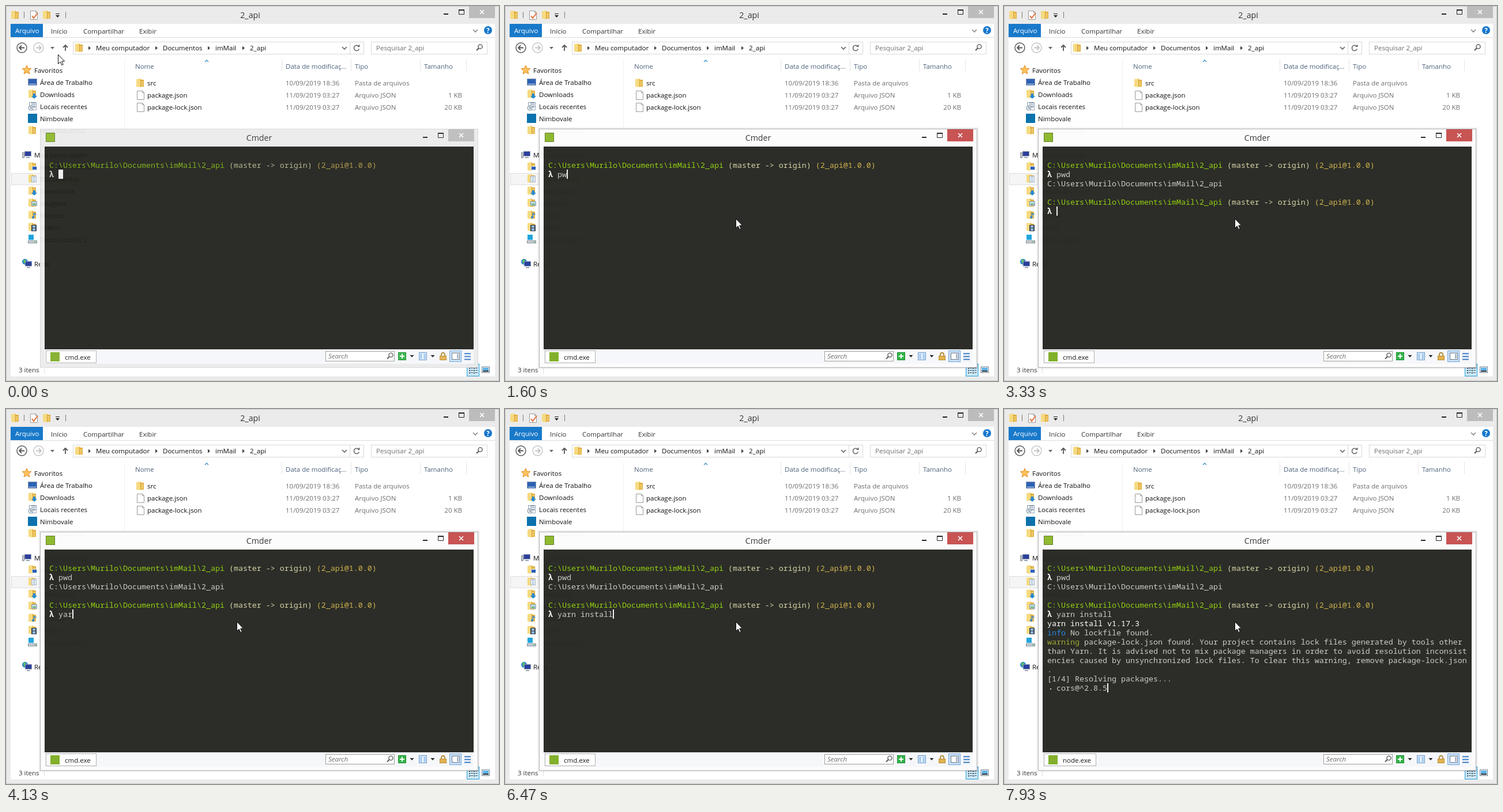
Write an HTML page that moves like this. It is 855 by 651 pixels and loops after 8 s.

```html
<!DOCTYPE html>
<html lang="pt-BR">
<head>
<meta charset="utf-8">
<title>Terminal</title>
<style>
  html, body { margin: 0; width: 100%; height: 100%; overflow: hidden; background: #ebebeb; }
  svg { display: block; width: 100vw; height: 100vh; }
  text { font-family: "Open Sans", "Noto Sans", sans-serif; font-size: 11.5px; white-space: pre; }
  .title { font-size: 14.2px; fill: #333; text-anchor: middle; }
  .term text { font-family: "Noto Sans Mono", "DejaVu Sans Mono", monospace; font-size: 13.333px; }
</style>
</head>
<body>
<svg id="stage" viewBox="0 0 855 651" xmlns="http://www.w3.org/2000/svg"></svg>
<script>
const LOOP = 8000, FOCUS = 400, BLINK = 530;

// ---------- drawing helpers ----------
const rect = (x, y, w, h, fill, stroke) => stroke
  ? `<rect x="${x + .5}" y="${y + .5}" width="${w - 1}" height="${h - 1}" fill="${fill}" stroke="${stroke}"/>`
  : `<rect x="${x}" y="${y}" width="${w}" height="${h}" fill="${fill}"/>`;
const path = (d, stroke, width = 1, fill = 'none') =>
  `<path d="${d}" stroke="${stroke}" stroke-width="${width}" fill="${fill}"/>`;
const shape = (d, fill) => `<path d="${d}" fill="${fill}"/>`;
const circle = (x, y, r, fill, stroke = 'none', width = 1) =>
  `<circle cx="${x}" cy="${y}" r="${r}" fill="${fill}" stroke="${stroke}" stroke-width="${width}"/>`;
const label = (x, y, s, fill = '#111', extra = '') =>
  `<text x="${x}" y="${y}" fill="${fill}" ${extra}>${s}</text>`;
const esc = s => s.replace(/&/g, '&amp;').replace(/</g, '&lt;').replace(/>/g, '&gt;');

// ---------- icons, placed by their top left corner ----------
const folder = (x, y) => rect(x + 7, y + 2, 7, 12, '#dfab3c') + rect(x + 9, y + 4, 4, 9, '#eec562') +
  shape(`M${x + 1} ${y + 1}l8 -1v15l-8 -1z`, '#f6da80') + path(`M${x + 8.5} ${y + 1}v13`, '#d3a136');
const sheet = (x, y) =>
  path(`M${x + .5} ${y + .5}h9l3 3v12h-12zM${x + 9.5} ${y + .5}v3h3`, '#9a9a9a', 1, '#fff');
const lines = (x, y, w, color) => path([0, 3, 6].map(d => `M${x} ${y + d + .5}h${w}`).join(''), color);
const lens = (x, y, color) => circle(x + 1.5, y - 1.5, 3.6, 'none', color, 1.4) +
  path(`M${x - 1} ${y + 1}l-4 4`, color, 2);
const caret = (x, y, color) => shape(`M${x - 3.5} ${y - 2}h7l-3.5 4z`, color);
const chevron = (x, y, color) => path(`M${x - 4} ${y - 2}l4 4l4 -4`, color, 1.7);
const downArrow = (x, y) => shape(`M${x + 2} ${y}h4v4h3l-5 5l-5 -5h3z`, '#2389d7');
const monitor = (x, y) => rect(x, y, 12, 9, '#2b3f9c', '#8b98ad') + rect(x + 3, y + 10, 6, 2, '#9ba3b0');
const icons = {
  star: (x, y) => path(`M${x + 8} ${y}l2.2 5.2l5.6 .5l-4.2 3.7l1.3 5.6l-4.9 -3l-4.9 3l1.3 -5.6l-4.2 -3.7l5.6 -.5z`, '#e28a23', 1, '#fbc25a'),
  desk: (x, y) => rect(x, y + 2, 16, 12, '#2d62b4', '#8999af') + rect(x + 2, y + 11, 12, 1, '#cfe0f5'),
  down: (x, y) => folder(x, y) + downArrow(x + 7, y + 7),
  recent: (x, y) => rect(x + 2, y + 1, 13, 9, '#eef4fa', '#8fa1b5') + lines(x + 6, y + 2, 7, '#778899') +
    rect(x + 6, y + 9, 9, 6, '#fff', '#9fabb8') + circle(x + 5, y + 11, 4, '#e5edf3', '#7d8e9c') +
    path(`M${x + 5} ${y + 8.5}v3h2`, '#456'),
  cloud: (x, y) => rect(x, y, 16, 16, '#0b72ad'),
  folder,
  pc: (x, y) => rect(x, y + 4, 4, 10, '#c5ccd5', '#8a929c') + monitor(x + 4, y + 2),
  deskFolder: (x, y) => folder(x, y) + rect(x + 7, y + 7, 9, 7, '#2b5eb3', '#dce5f0'),
  docs: (x, y) => folder(x, y) + rect(x + 6, y + 3, 9, 11, '#fff', '#a3b3c5') + lines(x + 8, y + 5, 5, '#6c93bd'),
  pics: (x, y) => folder(x, y) + rect(x + 6, y + 5, 10, 8, '#bfe1f6', '#8296a5') + rect(x + 8, y + 9, 6, 2, '#6aa556'),
  music: (x, y) => folder(x, y) + circle(x + 9, y + 12, 2, '#2b83cf') + path(`M${x + 10.5} ${y + 12}v-7l4 2`, '#2b83cf', 1.6),
  video: (x, y) => folder(x, y) + rect(x + 6, y + 4, 9, 11, '#39434d') + rect(x + 8, y + 5, 5, 4, '#91b8e2') + rect(x + 8, y + 10, 5, 4, '#91b8e2'),
  disk: (x, y) => rect(x + 1, y, 9, 9, '#22a5dc') + rect(x, y + 10, 16, 5, '#cdd3d9', '#818a93') + rect(x + 11, y + 12, 3, 1, '#35c443'),
  net: (x, y) => circle(x + 5, y + 5, 5, '#2a86d2') + shape(`M${x + 2} ${y + 2}l4 -1l1 4l-4 3z`, '#5fc057') + monitor(x + 5, y + 4)
};

const windowButtons = (x, y, color, id) =>
  rect(x - 44, y + 13, 8, 2, '#222') + path(`M${x - 17.5} ${y + 7}v7.5h9v-7.5`, '#222') +
  rect(x - 18, y + 6, 10, 2, '#222') +
  `<rect id="${id}" x="${x}" y="${y}" width="45" height="21" fill="${color}"/>` +
  path(`M${x + 19} ${y + 7}l7 7m0 -7l-7 7`, '#fff', 1.6);

// ---------- file browser ----------
const navItems = [
  ['star', 28, 111, 'Favoritos'], ['desk', 38, 132, 'Área de Trabalho'], ['down', 38, 153, 'Downloads'],
  ['recent', 38, 174, 'Locais recentes'], ['cloud', 38, 195, 'Nimbovale'], ['folder', 38, 216, 'rede industrial', '#701828'],
  ['pc', 28, 258, 'Meu computador'], ['deskFolder', 38, 279, 'Área de Trabalho'], ['docs', 38, 300, 'Documentos'],
  ['down', 38, 321, 'Downloads'], ['pics', 38, 342, 'Imagens'], ['music', 38, 363, 'Músicas'],
  ['video', 38, 384, 'Vídeos'], ['disk', 38, 405, 'Disco Local (C:)'], ['net', 28, 447, 'Rede']
];
const files = [
  [folder, 'src', '10/09/2019 18:36', 'Pasta de arquivos', ''],
  [sheet, 'package.json', '11/09/2019 03:27', 'Arquivo JSON', '1 KB'],
  [sheet, 'package-lock.json', '11/09/2019 03:27', 'Arquivo JSON', '20 KB']
];

function titleBar() {
  return rect(0, 0, 855, 651, '#ebebeb', '#c9c9c9') + folder(8, 8) +
    rect(31, 10, 1, 11, '#777') + sheet(42, 8) + path('M45 17l3 4l7 -9', '#e0703a', 2) +
    folder(63, 8) + rect(86, 13, 7, 1, '#222') + caret(89.5, 18, '#222') + rect(103, 10, 1, 11, '#777') +
    label(423.5, 21, '2_api', '#333', 'class="title"') + windowButtons(803, 0, '#bcbcbc', 'mainClose');
}

function ribbon() {
  const tabs = [[78, 'Início'], [134, 'Compartilhar'], [231, 'Exibir']];
  return rect(8, 31, 840, 612, '#fff') + rect(8, 31, 56, 23, '#1979ca') + label(16, 47, 'Arquivo', '#fff') +
    tabs.map(([x, s]) => label(x, 48, s, '#333')).join('') + rect(8, 54, 840, 1, '#dadbdc') +
    chevron(814, 43, '#8a8a8a') + circle(836, 42, 7, '#1577cc') +
    label(836, 46.5, '?', '#fff', 'text-anchor="middle" font-weight="700"');
}

function addressBar() {
  const crumbs = [[145, 156, 'Meu computador'], [261, 272, 'Documentos'], [352, 363, 'imMail'], [412, 423, '2_api']];
  const arrow = (x, dir, color) => circle(x, 72.5, 8.5, 'none', color, 1.4) +
    path(`M${x - 4.5} 72.5h9M${x - .5 * dir} 68.5l${-4 * dir} 4l${4 * dir} 4`, color, 1.8);
  return arrow(27.5, 1, '#555') + arrow(56.5, -1, '#c4c4c4') + caret(80.5, 73, '#666') +
    path('M103 78v-10M99 72l4 -4l4 4', '#555', 1.8) +
    rect(116, 62, 505, 22, '#fff', '#d9d9d9') + folder(119, 65) +
    crumbs.map(([a, x, s]) => shape(`M${a - 2} 69.5l4 3.5l-4 3.5z`, '#444') + label(x, 77, s)).join('') +
    chevron(587, 73, '#666') + rect(596, 63, 1, 20, '#d9d9d9') +
    path('M612 70.5a4.6 4.6 0 1 0 .4 4', '#666', 1.5) + shape('M609 71h4.500v-4.500z', '#666') +
    rect(633, 62, 202, 22, '#fff', '#d9d9d9') + label(642, 77, 'Pesquisar 2_api', '#6d6d6d') + lens(821, 72, '#555');
}

function navigation() {
  return rect(9, 290, 195, 21, '#f5f5f5', '#dedede') + rect(205, 93, 1, 528, '#f0f0f0') +
    navItems.map(([icon, x, y, name, color]) => icons[icon](x, y - 8) + label(x + 21, y + 5, name, color)).join('');
}

function fileList() {
  const heads = [[224, 'Nome'], [485, 'Data de modificaç...'], [605, 'Tipo'], [725, 'Tamanho']];
  return heads.map(([x, s]) => label(x, 109, s, '#4c607a')).join('') +
    [478, 598, 718, 798].map(x => rect(x, 92, 1, 21, '#e5e5e5')).join('') +
    path('M345 97l3 -3l3 3', '#3c8fc4', 1.3) +
    files.map(([icon, name, date, kind, size], i) => {
      const y = 138 + i * 21, grey = '#6d6d6d';
      return icon(icon === folder ? 225 : 227, y - 12) + label(245, y, name) + label(485, y, date, grey) +
        label(605, y, kind, grey) + label(791, y, size, grey, 'text-anchor="end"');
    }).join('');
}

function statusBar() {
  return label(22, 636, '3 itens', '#333') + rect(66, 626, 1, 12, '#e2e2e2') +
    rect(799, 621, 22, 22, '#cbe8f6', '#26a0da') +
    [803, 811].map(x => [628, 632, 636].map(y => rect(x, y, 2, 2, '#456') + rect(x + 3, y, 4, 1, '#456')).join('')).join('') +
    rect(825, 626, 14, 11, '#fff', '#6b7f92') + rect(827, 628, 10, 5, '#5bb0e6') + rect(827, 633, 10, 2, '#333');
}

// ---------- console window ----------
function consoleWindow() {
  return '<rect id="shadow" x="58" y="212" width="762" height="417" fill="none" stroke="#000" stroke-width="3"/>' +
    '<g id="console"><rect id="frame" x="59.500" y="213.500" width="759" height="414"/>' +
    rect(69, 220, 16, 16, '#8cb82b', '#5f7d25') + label(439, 234, 'Cmder', '#333', 'class="title"') +
    windowButtons(767, 214, '#c75050', 'close') +
    '<rect id="screen" x="67" y="244" width="744" height="352"/>' + rect(67, 596, 744, 25, '#f6f7fa') +
    '<rect id="tab" x="69.500" y="598.500" height="21" fill="#fff" stroke="#adadad"/>' +
    rect(77, 601, 16, 16, '#7fae26') + label(102, 614, '', '#111', 'id="tabName"') +
    rect(554, 599, 120, 18, '#fff', '#9a9a9a') + label(559, 612, 'Search', '#666', 'font-style="italic"') + lens(666, 607.5, '#555') +
    rect(680, 601, 14, 14, '#2fb344', '#1f8a33') + path('M683 608h8m-4 -4v8', '#fff', 2) + caret(704, 608, '#222') +
    rect(716, 601, 14, 14, '#cfe3f7', '#6f9ccb') + rect(718, 604, 10, 9, '#a9cdf0') + rect(722, 604, 2, 9, '#fff') + caret(740, 608, '#222') +
    path('M755 608v-3a3 3 0 0 1 6 0v3', '#b08a35', 1.8) + rect(752, 607, 12, 8, '#e1b04a', '#b78a33') +
    rect(769, 598, 21, 20, '#c9e0f7', '#6da5dc') + rect(773, 602, 14, 12, '#fff', '#687687') + rect(782, 604, 3, 8, '#a8b6c5') +
    path('M795 603.500h11m-11 5h11m-11 5h11', '#3579c4', 1.8) +
    '<g id="term" class="term"></g></g>';
}

// ---------- console contents ----------
const GREEN = '#8fce0c', TAN = '#d6d4a6', GOLD = '#ccb04a', GREY = '#cacaca', WHITE = '#fff', BLUE = '#2284e0', OLIVE = '#a0a832';
const cwd = 'C:\\Users\\Murilo\\Documents\\imMail\\2_api';
const prompt = [[GREEN, cwd], [TAN, ' (master -> origin)'], [GOLD, ' (2_api@1.0.0)']];
const entry = s => [[WHITE, 'λ', 700], [GREY, ' ' + s]];
const plain = s => [[GREY, s]];

const commands = [
  { text: 'pwd', keys: [1270, 1600, 1730] },
  { text: 'yarn install', keys: [3800, 4070, 4130, 4270, 4530, 5530, 5670, 5800, 6000, 6130, 6400, 6470] }
];
const RUN = 7130, NODE = 7400, RESOLVE = 7600, SPIN = 66;
// [time, rows to add]; each row is a list of coloured runs
const output = [
  [0, [prompt, () => entry(typed(0))]],
  [2130, [plain(cwd), []]],
  [2270, [prompt, () => entry(typed(1))]],
  [NODE, [[[WHITE, 'yarn install v1.17.3']]]],
  [7470, [[[BLUE, 'info'], [GREY, ' No lockfile found.']]]],
  [7530, [
    [[OLIVE, 'warning'], [GREY, ' package-lock.json found. Your project contains lock files generated by tools other']],
    plain('than Yarn. It is advised not to mix package managers in order to avoid resolution inconsist'),
    plain('encies caused by unsynchronized lock files. To clear this warning, remove package-lock.json'),
    plain('.')]],
  [RESOLVE, [plain('[1/4] Resolving packages...'), plain('  cors@^2.8.5')]]
];
// spans in which the cursor waits on an empty row
const newlines = [[2130, 2270], [RUN, RESOLVE]];
const events = [0, FOCUS, RUN, ...commands.flatMap(c => c.keys), ...output.map(o => o[0])];

let now = 0;
const typed = i => commands[i].text.slice(0, commands[i].keys.filter(k => k <= now).length);

// one dot that runs around a 2 by 4 cell
function spinner(y) {
  const i = Math.floor((now - RESOLVE) / SPIN) % 8;
  const column = i < 4 ? 0 : 1, step = i < 4 ? i : 7 - i;
  return rect(77 + 3 * column, y + 2 + 3.5 * step, 2, 2, GREY);
}

function terminal(active) {
  const rows = output.filter(o => o[0] <= now).flatMap(o => o[1]).map(r => typeof r === 'function' ? r() : r);
  const body = rows.map((runs, i) => `<text x="75" y="${281 + 16 * i}">` + runs.map(([color, s, weight = 400]) =>
    `<tspan fill="${color}" font-weight="${weight}">${esc(s)}</tspan>`).join('') + '</text>').join('');

  const fresh = newlines.some(([a, b]) => now >= a && now < b);
  const column = fresh ? 0 : rows.at(-1).reduce((n, run) => n + run[1].length, 0);
  const row = fresh && now >= RUN ? rows.length : rows.length - 1;
  const x = 75 + 8 * column, y = 268 + 16 * row;
  const last = Math.max(...events.filter(e => e <= now));
  const lit = Math.floor((now - last) / BLINK) % 2 === 0;
  return `<g opacity="${active ? 1 : .8}">${body}</g>` +
    (now >= RESOLVE ? spinner(y) : '') +
    (lit ? rect(x, y, active ? 2 : 8, 16, '#f0f0f0') : '');
}

function pointer() {
  const step = [70, 130, 200].filter(s => s <= now).length / 3;
  return [90 + 310 * step, 84 + 285 * step].map(Math.round);
}

const stage = document.getElementById('stage');
stage.innerHTML = titleBar() + ribbon() + addressBar() + navigation() + fileList() + statusBar() + consoleWindow() +
  '<path id="mouse" d="M.5 .5V16.500L4.200 13L6.800 18.700L9.200 17.700L6.700 12H11.500Z" fill="#fff" stroke="#111"/>';
const el = id => document.getElementById(id);
const set = (id, attrs) => Object.entries(attrs).forEach(([k, v]) => el(id).setAttribute(k, v));

function draw(t) {
  now = t;
  const active = t >= FOCUS, node = t >= NODE;
  set('console', { opacity: active ? .972 : .93 });
  set('shadow', { opacity: active ? .06 : 0 });
  set('frame', { fill: active ? '#fcfcfc' : '#ebebeb', stroke: active ? '#b0b0b0' : '#d8d8d8' });
  set('screen', { fill: active ? '#272822' : '#1d1e18' });
  set('close', { fill: active ? '#c75050' : '#bcbcbc' });
  set('tab', { width: node ? 90 : 87 });
  el('tabName').textContent = node ? 'node.exe' : 'cmd.exe';
  el('term').innerHTML = terminal(active);
  const [x, y] = pointer();
  set('mouse', { transform: `translate(${x} ${y})` });
}

const start = performance.now();
function tick() {
  draw((performance.now() - start) % LOOP);
  requestAnimationFrame(tick);
}
tick();
</script>
</body>
</html>
```
